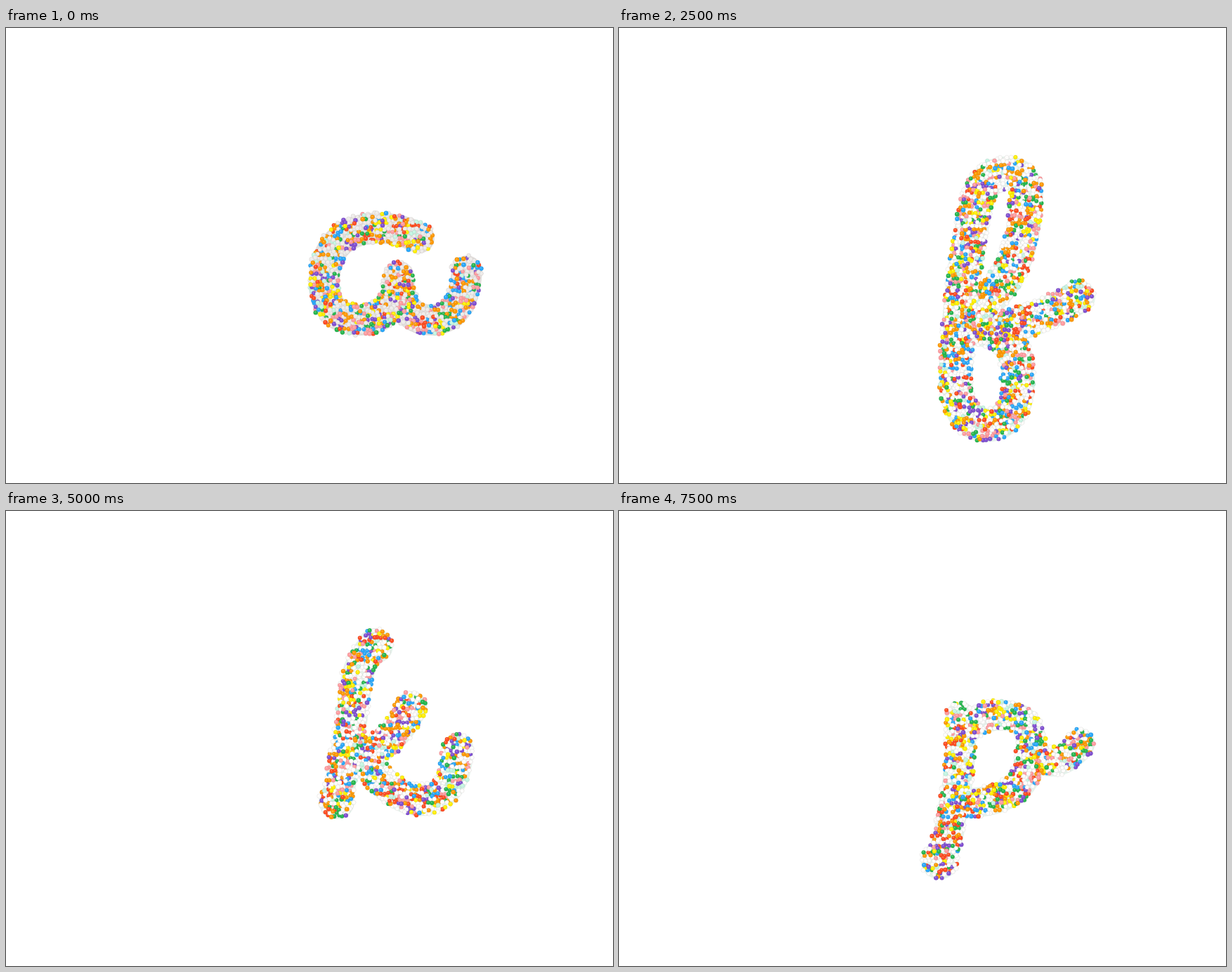
Recreate the animation shown at these times as an HTML page with a canvas. Size 864 by 648 pixels, loop 8 s.

```html
<!DOCTYPE html>
<html lang="en">
<head>
<meta charset="utf-8">
<title>Sprinkle alphabet</title>
<style>
  html, body { margin: 0; width: 100%; height: 100%; overflow: hidden; background: #fff; }
  canvas { display: block; }
</style>
</head>
<body>
<canvas id="stage" width="864" height="648"></canvas>
<script>
const WIDTH = 864, HEIGHT = 648;
const STEP = 500;
const SPACING = 5.3;

// Each letter is a list of [stroke width, path] pairs that sprinkles fill.
const letters = {
  a: [[44, 'M588 299Q560 284 525 285Q453 290 453 365Q455 416 505 416Q558 414 559 354Q560 416 606 416Q652 414 656 346']],
  b: [[46, 'M505 190Q455 270 453 350Q455 415 505 415Q575 412 575 345Q572 285 530 285Q490 290 460 330M575 335Q620 370 657 312']],
  c: [[45, 'M592 303Q565 285 530 285Q463 290 463 360Q465 415 530 415Q600 412 625 350']],
  d: [[54, 'M620 180h1'], [47, 'M620 180Q608 235 592 272Q552 412 632 411Q682 408 683 338M588 258Q558 264 528 264Q463 268 463 340Q464 409 515 409Q572 402 577 330']],
  e: [[45, 'M490 350Q575 345 575 310Q570 284 535 284Q468 290 467 360Q470 417 535 417Q620 412 640 345']],
  f: [[48, 'M654 383Q590 420 545 427M480 480Q485 360 509 250Q520 207 552 207Q585 207 579 250Q575 340 528 385M480 480Q475 560 520 566Q575 565 567 480Q560 430 500 428']],
  g: [[45, 'M585 290Q560 285 525 285Q457 290 455 350Q460 405 505 405Q570 400 583 295Q585 400 560 480Q545 522 510 522Q470 520 485 480Q530 430 600 410Q660 390 669 345']],
  h: [[47, 'M505 170Q485 220 478 290Q465 370 447 415M478 340Q500 275 545 275Q585 275 580 330Q570 415 625 415Q680 415 685 347']],
  i: [[58, 'M536 231h1'], [43, 'M520 296Q510 330 511 350Q510 416 553 416Q600 415 605 350']],
  j: [[58, 'M575 230h1'], [43, 'M565 295Q562 420 545 465Q530 493 500 493Q472 490 477 465Q500 425 560 410Q620 390 629 347']],
  k: [[50, 'M525 192h1M470 414h1'], [45, 'M525 192Q500 215 497 255Q488 340 470 414M577 279Q560 320 512 350M505 345Q545 410 590 412Q640 410 643 339']],
  l: [[46, 'M545 184Q505 250 498 340Q495 415 550 415Q610 412 618 345']],
  m: [[52, 'M418 418h1M516 411h1'], [43, 'M434 288Q442 345 418 416M443 315Q465 285 500 285Q532 285 530 330Q529 380 516 412M532 320Q555 285 595 285Q634 285 627 335Q608 419 655 420Q700 420 714 346']],
  n: [[50, 'M453 416h1'], [43, 'M470 284Q478 345 453 416M478 315Q500 282 545 282Q588 282 582 335Q570 420 615 420Q660 418 670 345']],
  o: [[45, 'M560 293Q470 285 463 355Q465 416 520 416Q590 412 588 350Q580 295 535 291M578 310Q615 355 655 315']],
  p: [[53, 'M456 498h1'], [43, 'M486 293Q490 360 472 440Q470 470 456 498M488 320Q505 291 545 291Q592 291 586 345Q585 410 500 416L480 419M585 345Q625 374 656 331']]
};
const names = Object.keys(letters);

const [red, orange, yellow, green, blue, purple, pink, mint] =
  ['#ff4d22', '#ff9a00', '#fff000', '#27b850', '#2aa8fa', '#8150d2', '#ff9ca0', '#c4f5e2'];
const colors = [red, red, orange, orange, orange, yellow, yellow, green, green,
                blue, blue, purple, purple, pink, pink, mint];

const stage = document.getElementById('stage').getContext('2d');
const cache = {};

function randomFrom(seed) {
  return () => {
    seed = (seed + 0x6D2B79F5) | 0;
    let n = Math.imul(seed ^ (seed >>> 15), 1 | seed);
    n = (n + Math.imul(n ^ (n >>> 7), 61 | n)) ^ n;
    return ((n ^ (n >>> 14)) >>> 0) / 4294967296;
  };
}

function disc(ctx, x, y, r, fill) {
  ctx.beginPath();
  ctx.arc(x, y, r, 0, Math.PI * 2);
  ctx.fillStyle = fill;
  ctx.fill();
}

function drawBall(ctx, { x, y, r, color }) {
  disc(ctx, x, y, r, color);
  ctx.lineWidth = 0.6;
  ctx.strokeStyle = 'rgba(60,50,50,.13)';
  ctx.stroke();
  disc(ctx, x - 0.5, y - 0.8, 0.8, 'rgba(255,255,255,.4)');
}

function renderLetter(name) {
  const canvas = document.createElement('canvas');
  canvas.width = WIDTH;
  canvas.height = HEIGHT;
  const ctx = canvas.getContext('2d', { willReadFrequently: true });
  ctx.lineCap = ctx.lineJoin = 'round';

  const random = randomFrom(name.charCodeAt(0) * 977);
  const muted = name === 'a' || name === 'm';
  const white = muted ? '#eeebe9' : '#fefdfc';

  // The pale backing also serves as the mask for placing balls.
  ctx.strokeStyle = muted ? '#e3dfdd' : '#e6f3ec';
  for (const [width, d] of letters[name]) {
    ctx.lineWidth = width;
    ctx.stroke(new Path2D(d));
  }
  const mask = ctx.getImageData(0, 0, WIDTH, HEIGHT).data;
  const inside = (x, y) => mask[(Math.round(y) * WIDTH + Math.round(x)) * 4 + 3] > 127;

  const balls = [];
  let color = white;
  let odd = 0;
  for (let top = 10; top < HEIGHT - 10; top += SPACING * 0.87) {
    odd = 1 - odd;
    for (let left = 10 + odd * SPACING / 2; left < WIDTH - 10; left += SPACING) {
      const x = left + (random() - 0.5) * 3.4;
      const y = top + (random() - 0.5) * 3.4;
      if (!inside(x, y)) continue;
      if (random() > 0.15) {
        color = random() < 0.36 ? white : colors[Math.floor(random() * colors.length)];
      }
      balls.push({ x, y, color, r: 2.8 + random() * 0.5, depth: random() });
    }
  }
  balls.sort((p, q) => p.depth - q.depth);
  for (const ball of balls) drawBall(ctx, ball);
  return canvas;
}

let shown = '';
function update(time) {
  const name = names[Math.floor(time / STEP) % names.length];
  if (name === shown) return;
  shown = name;
  cache[name] ||= renderLetter(name);
  stage.clearRect(0, 0, WIDTH, HEIGHT);
  stage.drawImage(cache[name], 0, 0);
}

function tick() {
  update(performance.now());
  requestAnimationFrame(tick);
}
tick();
</script>
</body>
</html>
```
